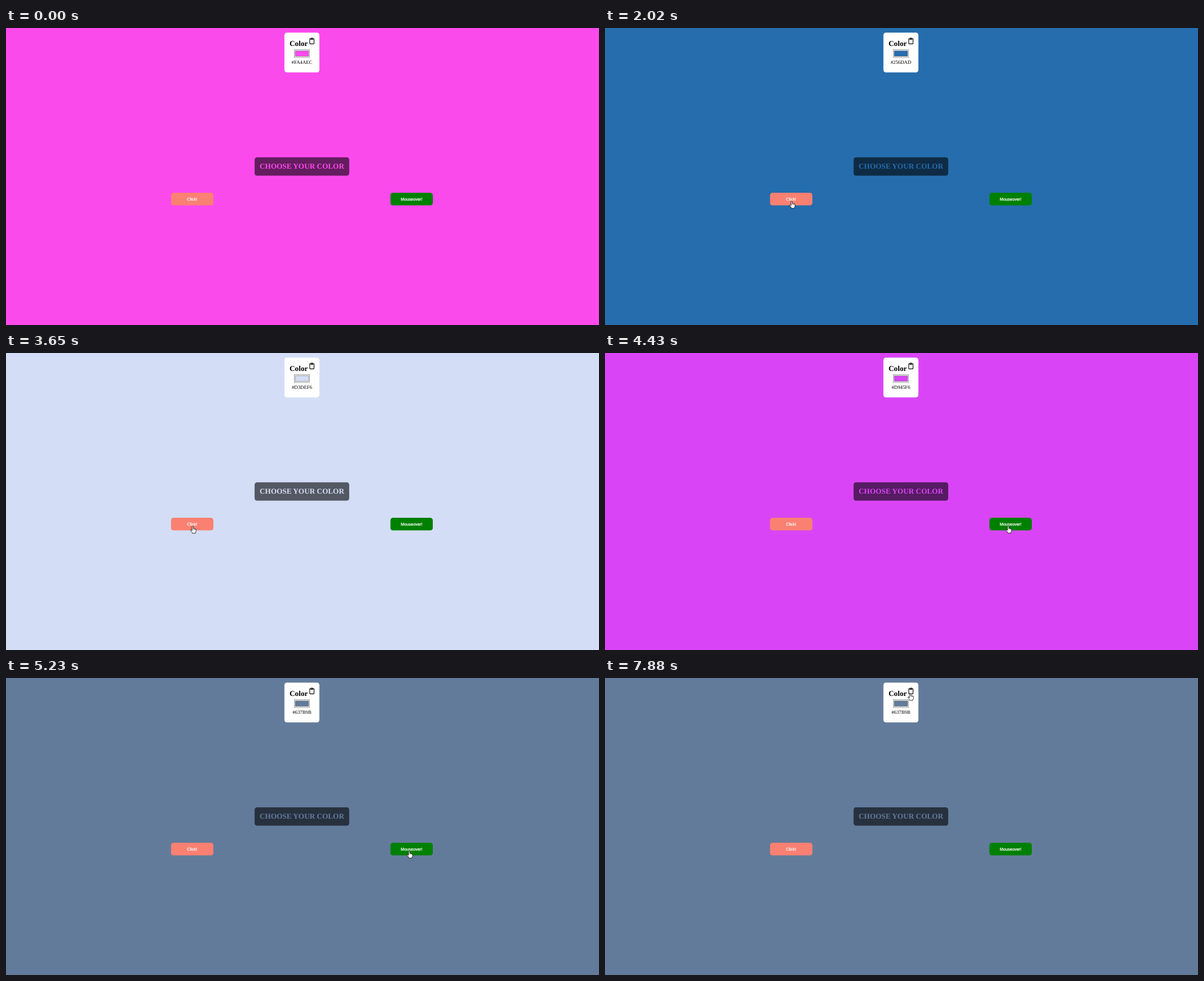
Recreate the animation shown at these times as an HTML page. Size 1056 px wide and 530 px high, loop 8000 ms.

```html
<!DOCTYPE html>
<html lang="en">
<head>
<meta charset="utf-8">
<title>Choose your color</title>
<style>
  html, body { margin: 0; width: 100%; height: 100%; overflow: hidden; }
  svg { display: block; width: 1056px; height: 530px; text-rendering: geometricPrecision; }
  text { text-anchor: middle; font-kerning: none; }
  .serif { font: 8.8px "Liberation Serif", "Times New Roman", serif; }
  .heading { font-size: 13.25px; font-weight: bold; }
  .label { font: 7.4px "Liberation Sans", Arial, sans-serif; fill: #fff; stroke: #fff; stroke-width: .25; }
  .themed { fill: var(--color); }
  .pointer { fill: #fff; stroke: #000; stroke-width: .8; stroke-linejoin: round; }
</style>
</head>
<body>
<svg id="stage" viewBox="0 0 1056 530">
  <rect class="themed" width="1056" height="530"/>

  <rect x="495.8" y="8.3" width="62.3" height="70.9" rx="4.4" fill="#fff"/>
  <text class="serif heading" x="521.2" y="32.2">Color</text>
  <g id="clipboard">
    <rect x="540.9" y="19.1" width="7.6" height="9.2" rx=".7" fill="#fff" stroke="#000" stroke-width="1.15"/>
    <path d="M542.5 18.5H543.2A1.5 1.5 0 0 1 546.2 18.5H546.9V20.8H542.5Z"/>
    <circle cx="544.7" cy="18.6" r=".6" fill="#fff"/>
  </g>
  <rect x="513.3" y="38.5" width="27.2" height="14.3" fill="#efefef" stroke="#767676" stroke-width=".6"/>
  <rect class="themed" x="515" y="40.8" width="24" height="9.7" stroke="#777" stroke-width=".6"/>
  <text class="serif" id="hex" x="527" y="63.9"></text>

  <rect x="442.7" y="230.7" width="168.5" height="32.8" rx="4.4" fill="#000" fill-opacity=".6"/>
  <text class="serif heading themed" x="527" y="251.3">CHOOSE YOUR COLOR</text>

  <rect x="293.9" y="294.1" width="75.4" height="22.5" rx="4.4" fill="salmon"/>
  <text class="label" x="331.4" y="308.1">Click!</text>
  <rect x="684.6" y="294.1" width="75.4" height="22.5" rx="4.4" fill="green"/>
  <text class="label" x="722.3" y="308.1">Mouseover!</text>

  <path class="pointer" id="arrow" d="M.4.6V12.6L3.2 10 5 14.4 7 13.6 5.2 9.4H9Z"/>
  <g class="pointer" id="hand">
    <path d="M-1.1 7.6V1.4Q-1.1.4 0 .4T1.1 1.4V4.7Q2.2 4 2.9 5.1 4 4.6 4.5 5.6 6 5.3 6 6.9V9.2Q6 10.8 5 11.8V13.3H-.7V12.2L-3.7 8.4Q-4.2 7.2-3.1 6.9-2.2 6.7-1.1 8.6Z"/>
    <path fill="none" stroke-width=".5" d="M1.1 4.7V7M2.9 5.1V7.1M4.5 5.6V7.2"/>
  </g>
</svg>
<script>
const DURATION = 8000;
const SAMPLE = 202;   // the pointer is redrawn about five times a second
const ENTER = 200;    // the pointer appears

const themes = [
  { at: 0, color: "#FA4AEC" },
  { at: 2020, color: "#256DAD" },
  { at: 2820, color: "#21BC43" },
  { at: 3650, color: "#D3DEF6" },
  { at: 4430, color: "#D945F6" },
  { at: 5230, color: "#637B9B" }
];

const entry = { x: 893, y: 485 };
const clickButton = { x: 332.4, y: 308.4, clickable: true };
const hoverButton = { x: 718, y: 308, clickable: true };
const belowButton = { x: 722, y: 319 };
const swatch = { x: 513, y: 45 };
const copyIcon = { x: 543.3, y: 26.6, clickable: true };

const glides = [
  { start: 200, end: 1210, to: clickButton },
  { start: 3650, end: 4430, to: hoverButton },
  { start: 4630, end: 4830, to: belowButton },
  { start: 5030, end: 5230, to: hoverButton },
  { start: 5230, end: 6450, to: swatch },
  { start: 6670, end: 7270, to: copyIcon }
];

const $ = id => document.getElementById(id);
const ease = p => p * p * (3 - 2 * p);
const mix = (a, b, p) => a + (b - a) * p;

function pointerAt(time) {
  let place = entry;
  for (const { start, end, to } of glides) {
    if (time < start) break;
    if (time >= end) { place = to; continue; }
    const sampled = Math.floor((time - start) / SAMPLE) * SAMPLE;
    const p = ease(sampled / (end - start));
    return { x: mix(place.x, to.x, p), y: mix(place.y, to.y, p), clickable: place.clickable && p === 0 };
  }
  return place;
}

function draw(time) {
  const { color } = themes.findLast(theme => theme.at <= time);
  const { x, y, clickable } = pointerAt(time);
  const shown = time < ENTER ? "" : clickable ? "hand" : "arrow";

  $("stage").style.setProperty("--color", color);
  $("hex").textContent = color;
  for (const id of ["arrow", "hand"]) {
    $(id).setAttribute("transform", `translate(${x} ${y})`);
    $(id).style.display = id === shown ? "" : "none";
  }
}

const startTime = performance.now();
function tick() {
  draw((performance.now() - startTime) % DURATION);
  requestAnimationFrame(tick);
}
tick();
</script>
</body>
</html>
```
